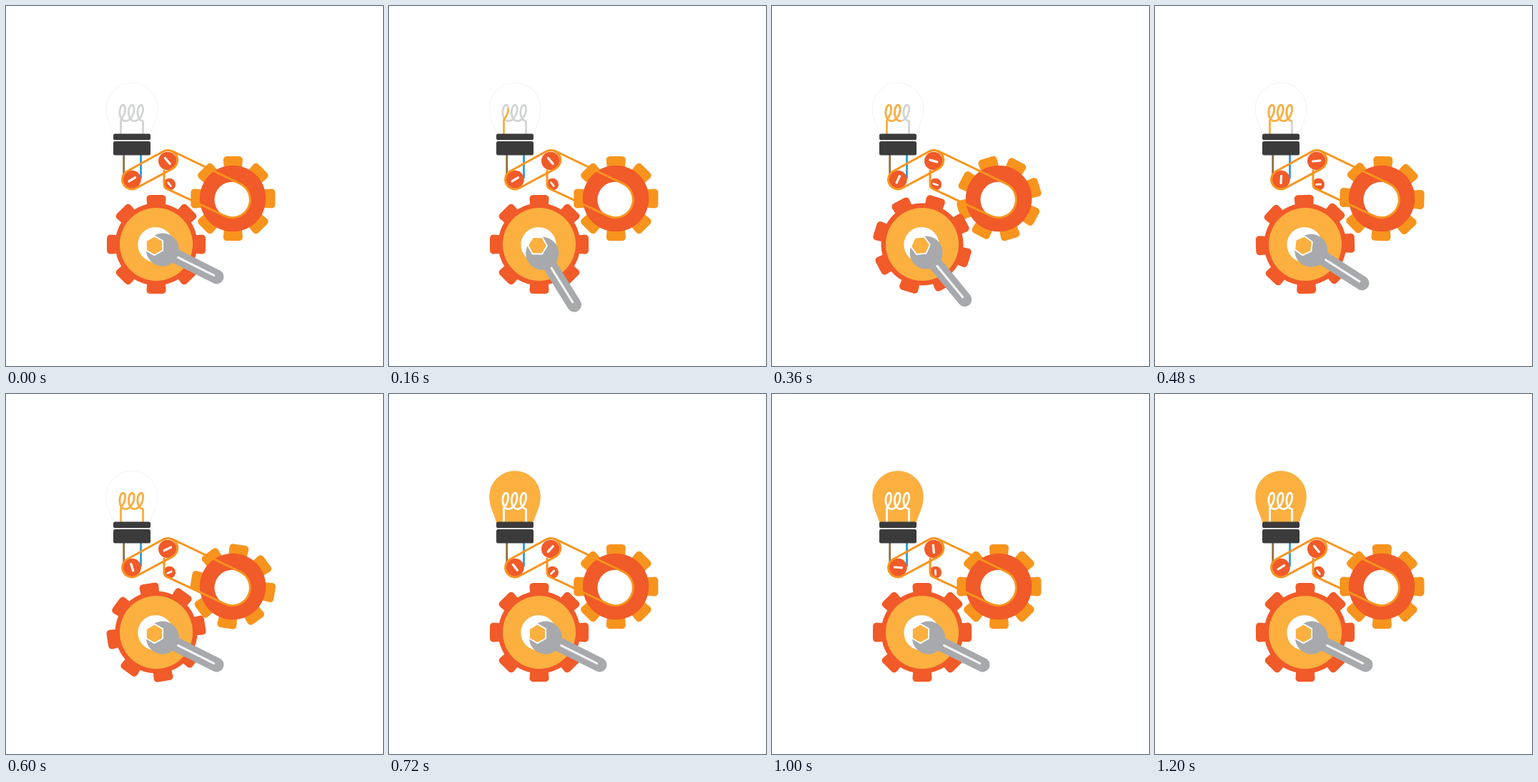
An HTML page with a canvas that plays this animation: 527x503 px, repeating every 1.52 s.

```html
<!DOCTYPE html>
<html lang="en">
<head>
<meta charset="utf-8">
<title>Gears and bulb</title>
<style>
html, body { margin: 0; width: 100%; height: 100%; overflow: hidden; background: #fff; }
canvas { display: block; }
</style>
</head>
<body>
<canvas id="stage" width="527" height="503"></canvas>
<script>
const ctx = document.getElementById('stage').getContext('2d');
const LOOP = 1520, STEP = 40, MOVE_END = 1200;
const RED = '#f15a29', ORANGE = '#f7941d', AMBER = '#fbb040';
const GREY = '#a7a9ac', DARK = '#3b3b3c', PALE = '#d1d3d4', WHITE = '#fff';
const REST = 26.6, SWING = 54;

const rad = deg => deg * Math.PI / 180;
const span = (t, from, to) => Math.min(1, Math.max(0, (t - from) / (to - from)));
const easeOut = (p, power) => 1 - (1 - p) ** power;

function disc(x, y, r, color) {
  ctx.fillStyle = color;
  ctx.beginPath();
  ctx.arc(x, y, r, 0, 2 * Math.PI);
  ctx.fill();
}

function box(x, y, w, h, r, color) {
  ctx.fillStyle = color;
  ctx.beginPath();
  ctx.roundRect(x, y, w, h, r);
  ctx.fill();
}

function line(x1, y1, x2, y2, width, color, cap = 'butt') {
  ctx.lineCap = cap;
  ctx.lineWidth = width;
  ctx.strokeStyle = color;
  ctx.beginPath();
  ctx.moveTo(x1, y1);
  ctx.lineTo(x2, y2);
  ctx.stroke();
}

function turned(x, y, deg, draw) {
  ctx.save();
  ctx.translate(x, y);
  ctx.rotate(rad(deg));
  draw();
  ctx.restore();
}

// Eight teeth, slightly wider at the rim, with rounded outer corners.
function teeth(x, y, inner, outer, deg, color) {
  ctx.fillStyle = color;
  for (let i = 0; i < 8; i++) {
    turned(x, y, deg + i * 45, () => {
      ctx.beginPath();
      ctx.moveTo(-12.5, -inner);
      ctx.arcTo(-14, -outer, 0, -outer, 5);
      ctx.arcTo(14, -outer, 12.5, -inner, 5);
      ctx.lineTo(12.5, -inner);
      ctx.fill();
    });
  }
}

function hexagon(r, offset, color) {
  ctx.fillStyle = color;
  ctx.beginPath();
  for (let i = 0; i < 6; i++) {
    const a = rad(offset + i * 60);
    ctx.lineTo(r * Math.cos(a), r * Math.sin(a));
  }
  ctx.fill();
}

// Filament: two legs joined by a leaning three-turn coil.
const filament = new Path2D();
let filamentLength = 0;
{
  const points = [[160.5, 179], [160.5, 160]];
  for (let a = -45; a <= 980; a += 5) {
    const c = Math.cos(rad(a)), s = Math.sin(rad(a));
    points.push([162.3 + 12.5 * (a / 360 - 0.25) + 6.5 * c + 1.5 * s, 149.5 - 11.2 * s]);
  }
  points.push([191.5, 161], [191.5, 179]);
  points.forEach(([x, y], i) => {
    filament.lineTo(x, y);
    if (i) filamentLength += Math.hypot(x - points[i - 1][0], y - points[i - 1][1]);
  });
}

const glass = new Path2D(
  'M150.5 181C147.5 168 140.2 159 140.2 143A35.8 35.8 0 0 1 211.8 143C211.8 159 204.5 168 201.5 181Z');

function strokeFilament(color, part = 1) {
  ctx.lineCap = 'butt';
  ctx.lineJoin = 'round';
  ctx.lineWidth = 2.8;
  ctx.strokeStyle = color;
  ctx.setLineDash(part < 1 ? [filamentLength * part, filamentLength] : []);
  ctx.stroke(filament);
  ctx.setLineDash([]);
}

function drawBulb(t, lit) {
  line(164.7, 207, 164.7, 238, 2.8, '#8f6f43');
  line(188.5, 207, 188.5, 241, 2.8, '#2b9bd7');
  ctx.fillStyle = lit ? AMBER : WHITE;
  ctx.fill(glass);
  if (lit) {
    strokeFilament(WHITE);
  } else {
    ctx.lineWidth = 0.6;
    ctx.strokeStyle = '#e9e9ea';
    ctx.stroke(glass);
    strokeFilament(PALE);
    const glow = span(t, 80, 520);
    if (glow > 0) strokeFilament(AMBER, glow);
  }
  box(150, 187, 52, 2, 0, WHITE);
  box(150, 178.5, 52, 8.7, 2.5, DARK);
  box(150, 189, 52, 19.5, 2.5, DARK);
}

function drawGears(turn) {
  teeth(317.3, 269, 42, 59, turn, ORANGE);
  disc(317, 269, 46.2, RED);
  disc(316.3, 270.6, 24.9, WHITE);

  teeth(210, 333, 52, 69, -turn, RED);
  disc(210, 333, 57.5, RED);
  disc(210, 333, 51, AMBER);
  disc(209, 333.5, 24.6, WHITE);
}

function pulley(x, y, r, deg, half, width) {
  disc(x, y, r, RED);
  turned(x, y, deg, () => line(-half, 0, half, 0, width, WHITE, 'round'));
}

function drawBelts(spin) {
  pulley(176.3, 242.3, 12.5, -31 - spin, 5, 3.2);
  pulley(225.8, 216.5, 12.8, 50 - spin, 5.2, 3.2);
  pulley(228.5, 249.2, 8.5, 53 - spin, 3.1, 2.7);

  ctx.strokeStyle = ORANGE;
  ctx.lineWidth = 3;
  ctx.lineCap = 'round';
  const axis = rad(-28.5), quarter = Math.PI / 2;
  ctx.beginPath();
  ctx.arc(176, 242.5, 13.4, axis + quarter, axis + 3 * quarter);
  ctx.arc(226, 215.3, 13.7, axis - quarter, axis + quarter);
  ctx.closePath();
  ctx.stroke();

  ctx.beginPath();
  ctx.moveTo(232, 202.5);
  ctx.arc(316.3, 270.6, 25, rad(-64.5), rad(114));
  ctx.arc(228.3, 249, 7.3, rad(114), rad(180));
  ctx.lineTo(221, 230);
  ctx.stroke();
}

function drawWrench(deg) {
  turned(207.5, 334.8, deg, () => {
    disc(12.7, 0, 23, GREY);
    line(25, 0, 97.3, 0, 20, GREY, 'round');
    line(37, 0, 93, 0, 3.2, '#f4f4f5', 'round');
    hexagon(14.5, 3.4, WHITE);
    hexagon(12.3, 3.4, AMBER);
  });
}

function draw(t) {
  const lit = t > 600;
  const back = span(t, 240, 600);
  const swing = t < 240 ? (t / 240) ** 1.33 : 1 - easeOut(back, 2);
  ctx.fillStyle = WHITE;
  ctx.fillRect(0, 0, 527, 503);
  drawBulb(t, lit);
  drawGears(lit ? 0 : SWING * easeOut(back, 1.8));
  drawBelts(180 * span(t, 160, MOVE_END));
  drawWrench(REST + SWING * swing);
}

const start = performance.now();
function tick() {
  const t = (performance.now() - start) % LOOP;
  draw(Math.min(MOVE_END, Math.floor(t / STEP) * STEP));
  requestAnimationFrame(tick);
}
tick();
</script>
</body>
</html>
```
